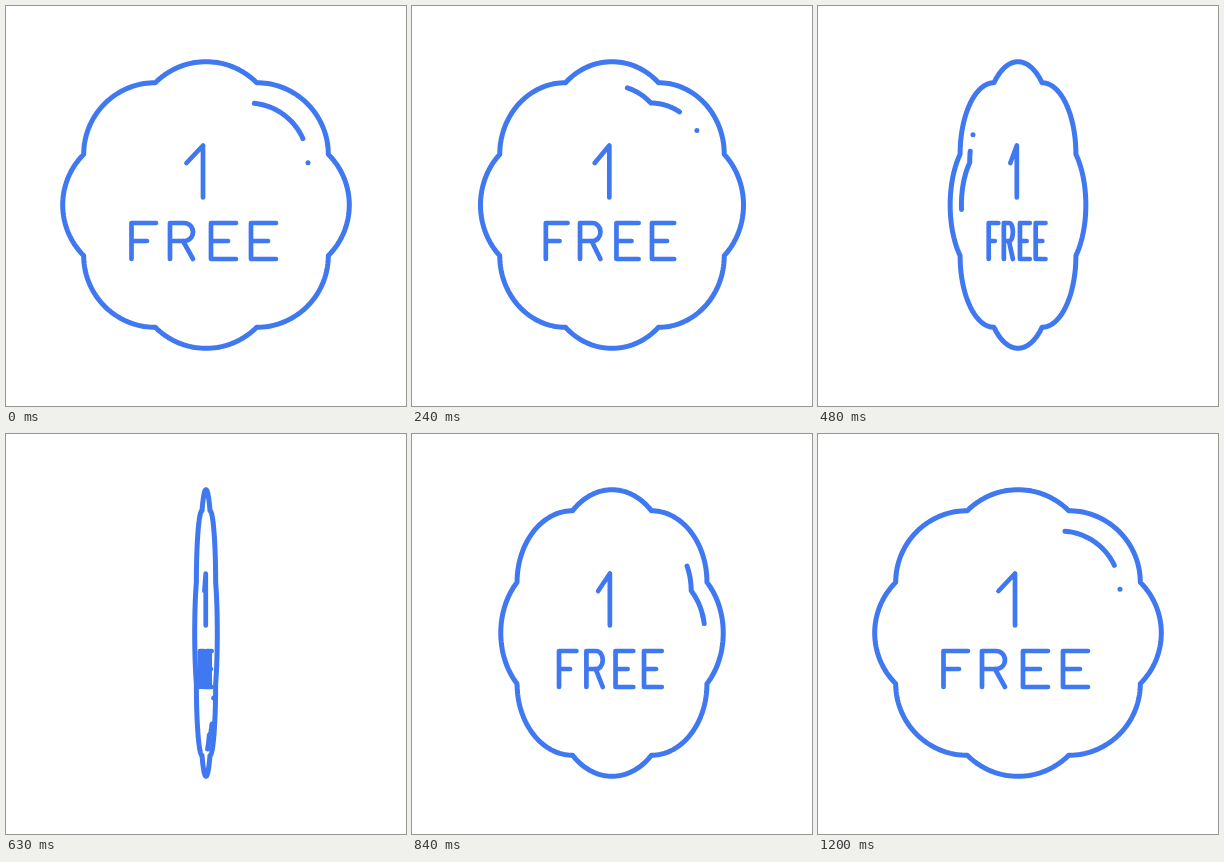
Animation, 400 px wide and 400 px high, one loop 4230 ms. Source, as an HTML page with a canvas:

```html
<!DOCTYPE html>
<html lang="en">
<head>
<meta charset="utf-8">
<title>1 FREE badge</title>
<style>
  html, body { margin: 0; height: 100%; overflow: hidden; background: #fff; }
  canvas { display: block; width: 100vw; height: 100vh; object-fit: contain; }
</style>
</head>
<body>
<canvas width="400" height="400" role="img" aria-label="1 FREE"></canvas>
<script>
const ctx = document.querySelector('canvas').getContext('2d');
const LOOP = 4230, STEP = 30, MOVE = 1200, TURN = 8.015;
const CX = 200, CY = 199, OUTER = 71.65, INNER = 59.75, THIN = 0.04;

// Single-line lettering: its stroke keeps its weight while the badge narrows
const letters = new Path2D(
  'M180.5 157L197 139.5V191.5' +
  'M125.5 253V217H150M125.5 235H141' +
  'M164 253V217H178a9 9 0 0 1 0 18H164M177 235L187 253' +
  'M230 217H205V253H230M205 235H222' +
  'M270 217H245V253H270M245 235H262');

function bezier(x1, y1, x2, y2) {
  const at = (a, b, s) => 3 * (1 - s) ** 2 * s * a + 3 * (1 - s) * s * s * b + s ** 3;
  return x => {
    let lo = 0, hi = 1;
    for (let i = 0; i < 24; i++) {
      const mid = (lo + hi) / 2;
      if (at(x1, x2, mid) < x) lo = mid; else hi = mid;
    }
    return at(y1, y2, lo);
  };
}

const edgeEase = bezier(0.9, 0, 0.842, 1);
const textEase = bezier(0.753, 0, 0.867, 1);
const arcEase = bezier(0.62, 0, 0.27, 1);
const dotEase = bezier(0.793, 0.06, 0, 1);

// Width factor: narrows to THIN at half time, then widens again
const width = (ease, u) => 1 - (1 - THIN) * ease(1 - Math.abs(1 - 2 * u));

// Point on the eight-lobed edge; p counts lobes counterclockwise from the right
function edge(p, radius, sx) {
  const lobe = Math.round(p);
  const a = lobe * Math.PI / 4, b = a + (p - lobe) * Math.PI / 2;
  return [CX + sx * radius * (Math.cos(a) + Math.cos(b)),
          CY - radius * (Math.sin(a) + Math.sin(b))];
}

function strokeEdge(from, to, radius, sx, closed) {
  const n = Math.ceil((to - from) * 40);
  ctx.beginPath();
  for (let i = 0; i <= n; i++) ctx.lineTo(...edge(from + (to - from) * i / n, radius, sx));
  if (closed) ctx.closePath();
  ctx.stroke();
}

function draw(time) {
  const u = Math.min(1, time / MOVE);
  const sx = width(edgeEase, u), tx = width(textEase, u);

  ctx.clearRect(0, 0, 400, 400);
  ctx.strokeStyle = ctx.fillStyle = '#3f78f0';
  ctx.lineCap = ctx.lineJoin = 'round';
  ctx.lineWidth = 5;
  strokeEdge(-0.5, 7.5, OUTER, sx, true);

  const mid = 1.1 + TURN * arcEase(u);
  strokeEdge(mid - 0.335, mid + 0.335, INNER, sx);

  ctx.beginPath();
  ctx.arc(...edge(0.5 + TURN * dotEase(u), INNER, sx), 2.5, 0, 2 * Math.PI);
  ctx.fill();

  const text = new Path2D();
  text.addPath(letters, { a: tx, d: 1, e: CX * (1 - tx) });
  ctx.lineWidth = 4.7;
  ctx.stroke(text);
}

const start = performance.now();
function tick() {
  const time = (performance.now() - start) % LOOP;
  draw(Math.floor(time / STEP) * STEP);
  requestAnimationFrame(tick);
}
tick();
</script>
</body>
</html>
```
